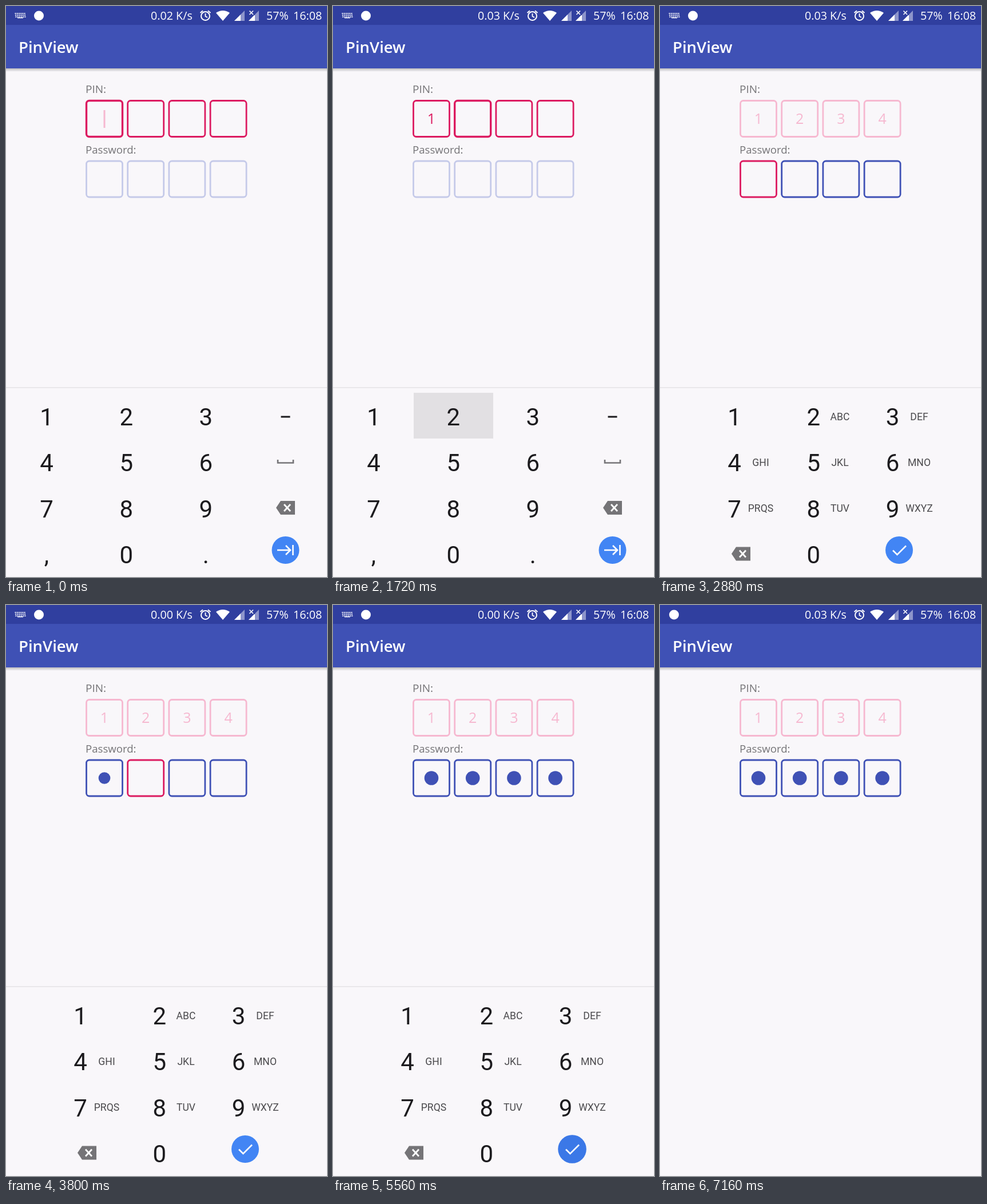
Animation, 561 px wide and 998 px high, one loop 7.72 s. Source, as an HTML page with a canvas:

```html
<!DOCTYPE html>
<html lang="en">
<head>
<meta charset="utf-8">
<title>PinView</title>
<style>
  html, body { margin: 0; width: 100%; height: 100%; overflow: hidden; background: #f9f7fa; }
  canvas { display: block; width: 561px; height: 998px; }
</style>
</head>
<body>
<canvas id="stage" width="561" height="998"></canvas>
<script>
const ctx = document.getElementById('stage').getContext('2d');
const LOOP = 7720;
const BG = '#f9f7fa', BLUE = '#3f51b5', PALE_BLUE = '#c5cae9';
const PINK = '#dc1a60', PALE_PINK = '#f6b8d0', ICON = '#757477';
const UI = '"Open Sans", "Noto Sans", sans-serif', KEYS = 'Roboto, sans-serif';

// Key strokes: when the key goes down, when it comes up and commits its character
const PIN = [[1480, 1560], [1690, 1800], [1900, 2000], [2280, 2400]];
const PASSWORD = [[3600, 3735], [3840, 3940], [4080, 4160], [4360, 4440]];
const FOCUS_NEXT = 2760, LAYOUT_SWAP = 2840;
const DONE_DOWN = 5560, DONE_UP = 5600, HIDE_START = 5640, HIDE_END = 5800;

const within = (t, from, to) => t >= from && t < to;

function rect(x, y, w, h, color) {
  ctx.fillStyle = color;
  ctx.fillRect(x, y, w, h);
}

function disc(x, y, r, color) {
  ctx.fillStyle = color;
  ctx.beginPath();
  ctx.arc(x, y, r, 0, 2 * Math.PI);
  ctx.fill();
}

function shape(points, color) {
  ctx.fillStyle = color;
  ctx.beginPath();
  points.forEach(([x, y]) => ctx.lineTo(x, y));
  ctx.closePath();
  ctx.fill();
}

function line(points, color, width) {
  ctx.strokeStyle = color;
  ctx.lineWidth = width;
  ctx.beginPath();
  points.forEach(([x, y], i) => i ? ctx.lineTo(x, y) : ctx.moveTo(x, y));
  ctx.stroke();
}

function text(str, x, y, font, color, align = 'left') {
  ctx.font = font;
  ctx.fillStyle = color;
  ctx.textAlign = align;
  ctx.fillText(str, x, y);
}

function shadow(y, height, alpha) {
  const g = ctx.createLinearGradient(0, y, 0, y + height);
  g.addColorStop(0, `rgba(0,0,0,${alpha})`);
  g.addColorStop(1, 'rgba(0,0,0,0)');
  rect(0, y, 561, height, g);
}

function signal(x) {
  shape([[x, 26], [x + 18, 8], [x + 18, 26]], '#8d95cb');
  shape([[x, 26], [x + 11, 15], [x + 11, 26]], '#fff');
}

function statusBar(t) {
  rect(0, 0, 561, 33, '#303f9f');
  const keyboardShown = t < HIDE_END;
  if (keyboardShown) {
    for (let row = 0; row < 3; row++)
      for (let col = 0; col < 6; col++)
        rect(15.5 + col * 3.2 + row * 0.4, 12 + row * 3, 2.2, 2, '#dfe2f3');
    rect(20, 20, 10, 1.5, '#dfe2f3');
  }
  disc(keyboardShown ? 57.5 : 24.5, 17, 8.5, '#fff');

  const speed = t < 520 ? '0.02' : within(t, 3540, 6560) ? '0.00' : '0.03';
  const font = `19.7px ${UI}`;
  text(`${speed} K/s`, 253, 24, font, '#fff');
  text('57%', 455, 24, font, '#fff');
  text('16:08', 502, 24, font, '#fff');

  ctx.strokeStyle = '#fff';
  ctx.lineWidth = 2;
  ctx.beginPath();
  ctx.arc(348.5, 17.5, 7.5, 0, 2 * Math.PI);
  ctx.stroke();
  line([[348.5, 13], [348.5, 18], [352, 20]], '#fff', 1.8);
  line([[339.5, 12], [344, 8.2]], '#fff', 2);
  line([[353, 8.2], [357.5, 12]], '#fff', 2);

  ctx.fillStyle = '#fff';
  ctx.beginPath();
  ctx.moveTo(379, 26);
  ctx.lineTo(367, 12);
  ctx.quadraticCurveTo(379, 4, 391, 12);
  ctx.fill();

  signal(399);
  signal(424);
  rect(423, 7, 12, 9, '#303f9f');
  line([[425.5, 8.5], [432, 15]], '#fff', 1.6);
  line([[432, 8.5], [425.5, 15]], '#fff', 1.6);
}

function appBar() {
  rect(0, 33, 561, 76, BLUE);
  text('PinView', 22, 82, `600 27.5px ${UI}`, '#fff');
  shadow(109, 6, 0.24);
}

const centerX = i => 172 + 72.2 * i;

function box(i, cy, color, width = 2.8) {
  ctx.strokeStyle = color;
  ctx.lineWidth = width;
  ctx.beginPath();
  ctx.roundRect(centerX(i) - 31.5, cy - 31.5, 63, 63, 5);
  ctx.stroke();
}

// New characters grow from half size, decelerating
function growth(t, commit) {
  const p = Math.min(1, (t - commit) / 150);
  return 1 - 0.5 * (1 - p) ** 2;
}

function pinField(t) {
  const focused = t < FOCUS_NEXT;
  const color = focused ? PINK : PALE_PINK;
  const typed = PIN.filter(([, up]) => t >= up).length;
  text('PIN:', 139, 152, `19px ${UI}`, ICON);
  for (let i = 0; i < 4; i++) {
    box(i, 197, color, focused && i === typed ? 3.4 : 2.8);
    if (i < typed) {
      const size = 25 * growth(t, PIN[i][1]);
      text(i + 1, centerX(i), 197 + size * 0.36, `${size}px ${UI}`, color, 'center');
    }
  }
  if (t < 120) rect(170.5, 182, 3, 31, PALE_PINK);
  else if (within(t, 120, 680) || within(t, 1120, PIN[0][1])) rect(170.5, 182, 3, 31, PINK);
}

function passwordField(t) {
  const focused = t >= FOCUS_NEXT;
  const typed = PASSWORD.filter(([, up]) => t >= up).length;
  text('Password:', 139, 257.5, `18.6px ${UI}`, ICON);
  for (let i = 0; i < 4; i++) {
    box(i, 302.5, !focused ? PALE_BLUE : i === typed ? PINK : BLUE);
    if (i < typed) disc(centerX(i), 302.5, 12.3 * growth(t, PASSWORD[i][1]), BLUE);
  }
}

const rowY = row => 718 + 80.3 * row;

function digit(str, x, row) {
  text(str, x, rowY(row) + 15, `42px ${KEYS}`, '#1c1b1e', 'center');
}

function backspace(x, y) {
  shape([[x - 17, y], [x - 9, y - 12], [x + 16, y - 12], [x + 16, y + 12], [x - 9, y + 12]], ICON);
  line([[x - 3, y - 6], [x + 8, y + 6]], '#fff', 2.8);
  line([[x + 8, y - 6], [x - 3, y + 6]], '#fff', 2.8);
}

function pressedKey(t, strokes, left, width) {
  strokes.forEach(([down, up], i) => {
    if (within(t, down, up))
      rect(left + (i % 3) * width, i < 3 ? 676 : 757, width, 80, '#e2e0e3');
  });
}

function numberPad(t) {
  pressedKey(t, PIN, 2, 139);
  ['123', '456', '789', ',0.'].forEach((keys, row) =>
    [...keys].forEach((key, col) => digit(key, 71 + 139.2 * col, row)));
  rect(480.5, 716.5, 16, 3, '#1c1b1e');
  line([[475, 793], [475, 798.5], [502, 798.5], [502, 793]], ICON, 2.6);
  backspace(489, 877);
  disc(488.5, 951, 24, '#4285f4');
  line([[474, 951], [497, 951]], '#fff', 2.6);
  line([[489, 943], [497, 951], [489, 959]], '#fff', 2.6);
  line([[501.5, 942], [501.5, 960]], '#fff', 2.6);
}

function phonePad(t) {
  pressedKey(t, PASSWORD, 73, 138);
  ['', 'ABC', 'DEF', 'GHI', 'JKL', 'MNO', 'PRQS', 'TUV', 'WXYZ'].forEach((letters, i) => {
    const col = i % 3, row = Math.floor(i / 3);
    digit(i + 1, 130 + 138.3 * col, row);
    text(letters, 176 + 138.5 * col, rowY(row) + 5.5, `17.6px ${KEYS}`, '#4a494c', 'center');
  });
  digit('0', 268.3, 3);
  backspace(142, 957.5);
  const held = within(t, DONE_DOWN, DONE_UP);
  disc(418, 951, held ? 24.8 : 24, held ? '#3b78e7' : '#4285f4');
  line([[407, 951.5], [414.5, 959], [430, 943.5]], '#fff', 2.6);
}

function keyboard(t) {
  if (t >= HIDE_END) return;
  const p = Math.max(0, (t - HIDE_START) / (HIDE_END - HIDE_START));
  ctx.save();
  ctx.globalAlpha = 1 - p;
  ctx.translate(0, 40 * p * p);
  rect(0, 667, 561, 331, BG);
  rect(0, 666, 561, 2, '#e9e7ea');
  (t < LAYOUT_SWAP ? numberPad : phonePad)(t);
  ctx.restore();
}

function draw(now) {
  const t = now % LOOP;
  rect(0, 0, 561, 998, BG);
  statusBar(t);
  appBar();
  pinField(t);
  passwordField(t);
  keyboard(t);
}

const start = performance.now();
function tick() {
  draw(performance.now() - start);
  requestAnimationFrame(tick);
}
tick();
</script>
</body>
</html>
```
